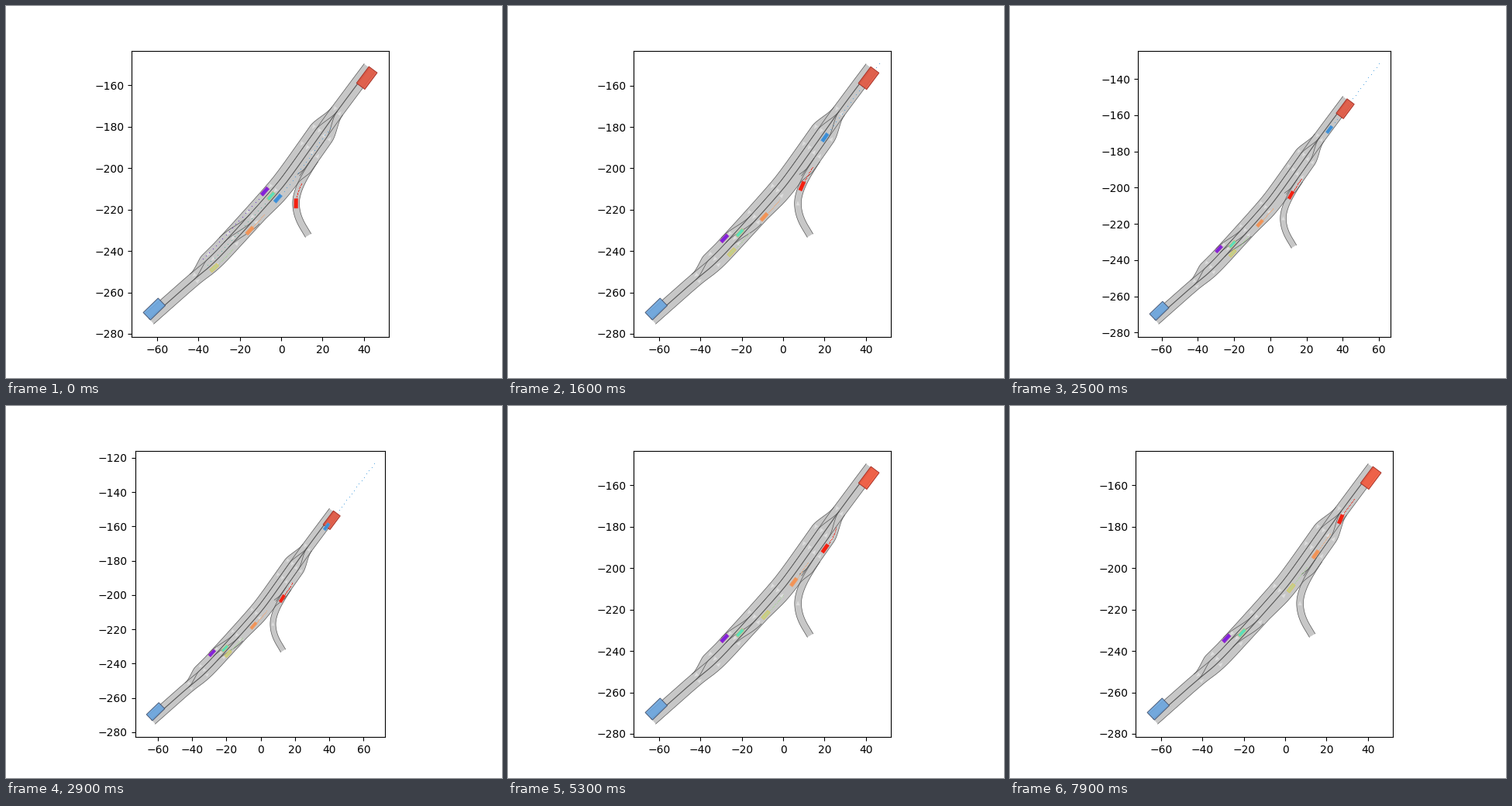
These frames come from a looping animation (640x480 px, 8 s). A matplotlib script:

```python
import numpy as np
import matplotlib.pyplot as plt
from matplotlib.animation import FuncAnimation
from matplotlib.patches import Polygon
from matplotlib.ticker import MultipleLocator

FRAMES, HORIZON = 80, 19
LANE, ROAD_END = 3.25, 162
LOW, HIGH = np.array([-66.65, -275.3]), np.array([46.4, -149.5])
EDGE = "#555555"
GOAL_REACHED = 30


def ease(s, a, b):
    u = np.clip((s - a) / (b - a), 0, 1)
    return u * u * (3 - 2 * u)


def round_corners(pts, times=3):
    p = np.array(pts, float)
    for _ in range(times):
        cut = np.stack([0.75 * p[:-1] + 0.25 * p[1:], 0.25 * p[:-1] + 0.75 * p[1:]], 1)
        p = np.vstack([p[:1], cut.reshape(-1, 2), p[-1:]])
    return p


class Path:
    """Curve addressed by distance along it and offset to its right."""

    def __init__(self, pts):
        self.pts = pts
        self.dist = np.r_[0, np.cumsum(np.hypot(*np.diff(pts, axis=0).T))]

    def point(self, s):
        return np.stack([np.interp(s, self.dist, c) for c in self.pts.T], -1)

    def heading(self, s):
        d = self.point(s + 1) - self.point(s - 1)
        return np.arctan2(d[..., 1], d[..., 0])

    def at(self, s, lanes=0.0):
        a = self.heading(s)
        side = np.stack([np.sin(a), -np.cos(a)], -1)
        return self.point(s) + side * np.asarray(lanes * LANE)[..., None]


def left_lanes(s):
    return 1 + ease(s, 29, 40) - ease(s, 122, 136)


def right_lanes(s):
    return (1 + 0.15 * ease(s, 28, 44) + 0.3 * ease(s, 70, 88)
            + 0.55 * ease(s, 97, 105) - ease(s, 122, 136))


def turned(shape, angle, center):
    c, s = np.cos(angle), np.sin(angle)
    return shape @ np.array([[c, s], [-s, c]]) + center


def rect(length, width):
    return np.array([[-1, -1], [1, -1], [1, 1], [-1, 1]]) * [length / 2, width / 2]


road = Path(round_corners([(-63.7, -272.8), (-41.95, -253.5), (-32.8, -246.3),
                           (-19.7, -232.2), (-2.25, -212.8), (4.2, -204.8),
                           (17.65, -185.7), (27.3, -171.9), (78.7, -103.7)]))
tail = np.linspace(112, 200, 100)
ramp = Path(np.vstack([
    round_corners([(13.1, -232.5), (8.3, -224.5), (6.8, -217), (8.2, -210.5),
                   (11.6, -203.5), road.at(112.0, 1.5)]),
    road.at(tail, right_lanes(tail) - 0.5)[1:]]))

fig, ax = plt.subplots(figsize=(6.4, 4.8), dpi=100)
ax.set_aspect("equal")
for axis in (ax.xaxis, ax.yaxis):
    axis.set_major_locator(MultipleLocator(20))


def stroke(path, s, lanes, width=0.5):
    ax.plot(*path.at(s, lanes).T, color=EDGE, lw=width, zorder=2)


def surface(path, s, left, right):
    outline = np.vstack([path.at(s, -left), path.at(s, right)[::-1]])
    ax.fill(*outline.T, fc="#c7c7c7", lw=0, zorder=1)
    stroke(path, s, -left)
    stroke(path, s, right)


# Road, ramp and lane bounds
along = np.linspace(0, ROAD_END, 300)
half = np.full(80, 0.5)
surface(road, along, left_lanes(along), right_lanes(along))
surface(ramp, np.linspace(0, 40, 80), half, half)
stroke(road, along, 0 * along, 0.8)
wide = np.linspace(29, 136, 200)
stroke(road, wide, 0 * wide - 1)
stroke(road, wide, 1 - left_lanes(wide))
merge = np.linspace(100, 136, 80)
stroke(road, merge, 0 * merge + 1)
stroke(road, merge, right_lanes(merge) - 1)
cross = np.linspace(52, 70, 50)
for k in (-2, -1, 0):
    stroke(road, cross, k + ease(cross, 52, 70))

# Direction marks at the start of each lane
arrow = np.array([[-1.1, -0.9], [1.1, 0], [-1.1, 0.9]])
for s in (30, 42, 56, 70, 87, 113, 123, 136):
    for k in (-1.5, -0.5, 0.5, 1.5):
        if -left_lanes(s) < k - 0.3 and k + 0.3 < right_lanes(s):
            angle = road.heading(s) + (np.pi if k < 0 else 0)
            mark = turned(arrow, angle, road.at(s, k))
            ax.add_artist(Polygon(mark, fc="#dddddd", lw=0, zorder=3))
ax.add_artist(Polygon(turned(arrow, ramp.heading(17), ramp.point(17)), fc="#dddddd",
                      lw=0, zorder=3))


def add_area(center, degrees, face, edge):
    area = Polygon(turned(rect(10, 5), np.radians(degrees), center), fc=face, ec=edge,
                   lw=0.7, alpha=0.92, zorder=5)
    ax.add_artist(area)
    return area


add_area((-61.3, -268.05), 44, "#6ca6de", "#45536f")
goal = add_area((41.4, -156.4), 53.2, "#e25843", "#a02a20")


class Car:
    def __init__(self, face, edge, dots, start, speed, lane=0.0, gain=0.0, path=road,
                 stop=np.inf, gone=np.inf):
        self.start, self.speed, self.gain = start, speed, gain
        self.lane = lane if callable(lane) else lambda s: lane + 0 * s
        self.path, self.stop, self.gone = path, stop, gone
        self.plan, = ax.plot([], [], "o", ms=0.8, mew=0, color=dots, zorder=4)
        self.body = Polygon(rect(1, 1), fc=face, ec=edge, lw=0.5, zorder=6)
        ax.add_artist(self.body)

    def place(self, s):
        return self.path.at(s, self.lane(s))

    def draw(self, t):
        now = min(t, self.stop)
        s = self.start + self.speed * now + self.gain * now ** 2
        pace = self.speed + 2 * self.gain * now
        dx, dy = self.place(s + pace) - self.place(s)
        self.body.set_xy(turned(rect(4.5, 1.7), np.arctan2(dy, dx), self.place(s)))
        ahead = self.place(s + pace * np.arange(1, HORIZON + 1))
        self.plan.set_data(*ahead.T)
        self.body.set_visible(t < self.gone)
        self.plan.set_visible(t < min(self.stop, self.gone))
        return ahead[-1]


teal = Car("#5ce0bb", "#c9c07a", "#5cb79c", 83.8, -2.39, -0.45, stop=10)
yellow = Car("#c3cf8c", "#e0c75a", "#a9d596", 39.8, 0.657, 0.6)
orange = Car("#f39355", "#e9a070", "#eda878", 64.5, 0.55, 0.62, gain=0.0006)
purple = Car("#7f22dc", "#a02ac0", "#6a2bd0", 83.5, -2.36,
             lambda s: 0.4 - left_lanes(s), stop=13)
blue = Car("#3a8fd9", "#5b9bd5", "#4fa3e0", 85.1, 2.23, 0.55, gain=0.0033,
           gone=GOAL_REACHED)
red = Car("#f5200f", "#e8302a", "#f02a1c", 16.8, 0.54, gain=0.0005, path=ramp)


def update(t):
    for car in (teal, yellow, orange, purple, red):
        car.draw(t)
    tip = blue.draw(t)
    busy = t < GOAL_REACHED
    goal.set_facecolor("#e25843" if busy else "#f25a3e")
    high = np.maximum(HIGH, tip) if busy else HIGH
    pad = 0.05 * (high - LOW)
    ax.set_xlim(LOW[0] - pad[0], high[0] + pad[0])
    ax.set_ylim(LOW[1] - pad[1], high[1] + pad[1])
    return []


anim = FuncAnimation(fig, update, frames=FRAMES, interval=100, repeat=True,
                     repeat_delay=0, blit=False)
plt.show()
```
